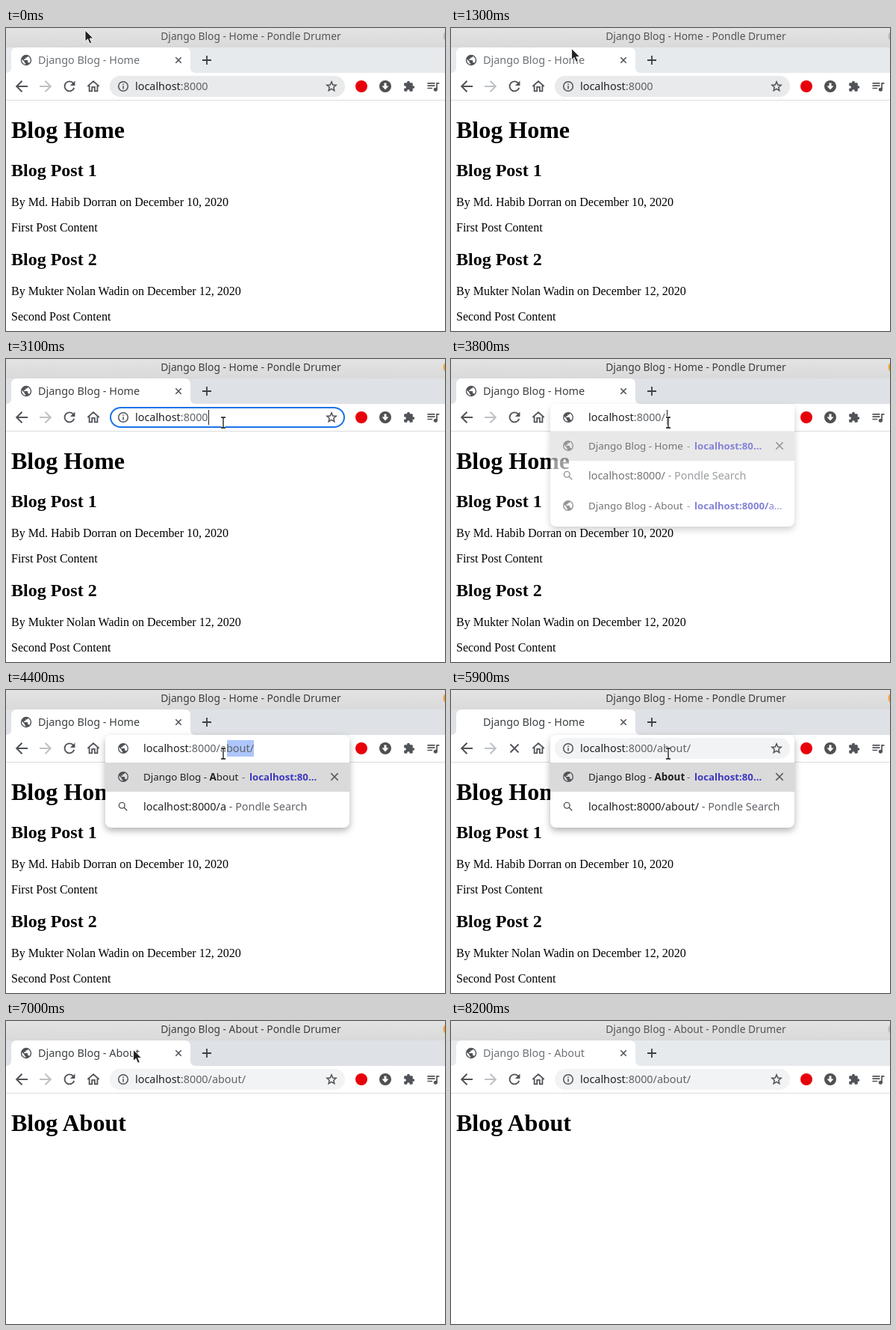
Animation of 588 by 405 pixels, one loop 8.4 s. Source, as an HTML page:

```html
<!DOCTYPE html>
<html lang="en">
<head>
<meta charset="utf-8">
<title>Blog in a browser</title>
<style>
  html, body { margin: 0; width: 100%; height: 100%; overflow: hidden; background: #fff; }
  svg { display: block; width: 588px; height: 405px; }
  text { font: 14.4px "Noto Sans", sans-serif; fill: #5f6368; }
  .title { font-size: 13.8px; text-anchor: middle; }
  .row { font-size: 13.4px; }
  .url { font-size: 13.2px; fill: #3c38c0; }
  .dark { fill: #202124; }
  b, .bold { font-weight: bold; }
  .page { font-family: "Liberation Serif", serif; fill: #000; }
  .line { fill: none; stroke: #505358; stroke-width: 2; }
  .popup { filter: drop-shadow(0 4px 5px rgba(0, 0, 0, .3)); }
</style>
</head>
<body>
<svg id="stage" viewBox="0 0 588 405"></svg>
<script>
const LOOP = 8400, STEP = 100;
const stage = document.getElementById('stage');
const BROWSER = 'Pondle Drumer', SEARCH = 'Pondle Search';
const INK = '#505358';

const text = (x, y, cls, s, extra = '') => `<text x="${x}" y="${y}" class="${cls}" ${extra}>${s}</text>`;
const span = (cls, s) => `<tspan class="${cls}">${s}</tspan>`;
const rect = (x, y, w, h, fill, r = 0, extra = '') =>
  `<rect x="${x}" y="${y}" width="${w}" height="${h}" rx="${r}" fill="${fill}" ${extra}/>`;
const circle = (x, y, r, fill) => `<circle cx="${x}" cy="${y}" r="${r}" fill="${fill}"/>`;
const stroke = (d, extra = '') => `<path class="line" d="${d}" ${extra}/>`;
const cross = (x, y, r, w = 1.6) =>
  stroke(`M${x - r} ${y - r}l${2 * r} ${2 * r}m0 ${-2 * r}l${-2 * r} ${2 * r}`, `style="stroke-width:${w}"`);

// Icons are drawn on a 24 unit grid and centred on the given point
const icon = (x, y, k, body) =>
  `<g transform="translate(${x} ${y}) scale(${k}) translate(-12 -12)">${body}</g>`;
const GLOBE = `<path fill="${INK}" d="M12 2a10 10 0 1 0 0 20 10 10 0 1 0 0-20zm-1 17.93c-3.95-.49-7-3.85-7-7.93 0-.62.08-1.21.21-1.79L9 15v1c0 1.1.9 2 2 2zm6.9-2.54c-.26-.81-1-1.39-1.9-1.39h-1v-3c0-.55-.45-1-1-1H8v-2h2c.55 0 1-.45 1-1V7h2c1.1 0 2-.9 2-2v-.41c2.93 1.19 5 4.06 5 7.41 0 2.08-.8 3.97-2.1 5.39z"/>`;
const INFO = stroke('M12 3a9 9 0 1 0 0 18 9 9 0 1 0 0-18M12 7v2m0 2v6', 'style="stroke-width:2.2"');
const STAR = stroke('M12 4l2.3 5.4 5.8.5-4.4 3.8 1.3 5.7-5-3-5 3 1.3-5.7-4.4-3.8 5.8-.5z');
const LENS = stroke('M9.5 4a5.5 5.5 0 1 0 0 11 5.5 5.5 0 1 0 0-11M13.5 13.5l6 6');
const RELOAD = stroke('M17.5 7.5A7 7 0 1 0 18.7 14') + `<path fill="${INK}" d="M20 4v7h-7z"/>`;
const HOME = stroke('M3.5 12L12 4.4l8.5 7.6M6 11v8h4v-6h4v6h4v-8');
const PUZZLE = rect(2, 5, 17, 17, INK, 2) + circle(10.5, 4, 2.7, INK) + circle(20, 13.5, 2.7, INK) +
  circle(3.2, 13.5, 2.7, '#fff') + circle(10.5, 20.8, 2.7, '#fff');
const QUEUE = stroke('M3 7h12M3 11h12M3 15h8M18 17V7h4') + circle(16, 17, 3, INK);

const address = (x, tail) =>
  text(x, 83, '', span('dark', 'localhost') + ':8000' + tail);
const caret = x => rect(x, 68, 1, 20, '#202124');
const selection = (x, w) => rect(x, 67, w, 22, '#adc6fb');

function windowFrame(s) {
  const focus = s.focus;
  return rect(0, 0, 588, 27, 'url(#bar)') +
    text(328, 16, 'title', `${s.title} - ${BROWSER}`, `style="fill:${focus ? '#3d3d3d' : '#555'}"`) +
    circle(594, 11, 8.5, focus ? '#f2a33a' : '#bdbdbd') +
    rect(0, 26, 588, 34, focus ? '#dee1e6' : '#e7eaed') +
    '<path fill="#fff" d="M0 60q7 0 7-7V34q0-8 8-8h224q8 0 8 8v19q0 7 7 7z"/>' +
    (s.spinner ? stroke('M21.5 40a7 7 0 0 1 9.5-3', 'style="stroke:#8a8d91;stroke-width:1.6"') : '') +
    (s.favicon ? icon(27, 43, .72, GLOBE) : '') +
    text(43, 48, '', s.title, `style="fill:${focus ? '#3c4043' : '#6d7175'}"`) +
    cross(231, 43, 3.7) +
    stroke('M263 43h12m-6-6v12', `style="stroke-width:1.8;stroke:#3c4043"`) +
    rect(0, 60, 588, 37, '#fff') + rect(0, 96, 588, 1, '#dadce0') +
    icon(21, 78, 1, stroke('M20 12H5.5M12.5 4.7L5.2 12l7.3 7.3')) +
    icon(53, 78, 1, stroke('M4 12h14.5M11.5 4.7l7.3 7.3-7.3 7.3', 'style="stroke:#bdc1c6"')) +
    (s.loading ? cross(85, 78, 5.5, 1.8) : icon(85, 78, .93, RELOAD)) +
    icon(117, 78, .9, HOME) +
    circle(476, 78, 8, '#e8000b') +
    circle(508, 78, 8, '#505050') +
    '<path fill="#fff" d="M506.5 73.500h3v4h3l-4.500 5-4.500-5h3z"/>' +
    icon(540, 78, .68, PUZZLE) + icon(572, 78, .84, QUEUE);
}

function pill(s) {
  const ring = s.ring ? 'stroke="#1a73e8" stroke-width="2"' : '';
  const inset = s.ring ? 1 : 0;
  return rect(139 + inset, 64 + inset, 315 - 2 * inset, 28 - 2 * inset, s.ring ? '#fff' : s.pill, 14, ring) +
    icon(157, 78, .7, INFO) + icon(436, 78, .76, STAR) +
    (s.selected ? selection(173, 98) : '') + address(173, s.path) +
    (s.caret ? caret(271) : '');
}

function homePage() {
  const post = (y, n, author, day, word) =>
    text(7, y, 'page bold', `Blog Post ${n}`, 'style="font-size:24px"') +
    text(7, y + 40, 'page', `By ${author} on December ${day}, 2020`, 'style="font-size:16px"') +
    text(7, y + 74, 'page', `${word} Post Content`, 'style="font-size:16px"');
  return post(198, 1, 'Md. Habib Dorran', 10, 'First') + post(317, 2, 'Mukter Nolan Wadin', 12, 'Second');
}

const heading = s => text(7, 147, 'page bold', s, 'style="font-size:32px"');

function siteRow(y, name, url) {
  return icon(157, y - 5, .7, GLOBE) +
    text(184, y, 'row dark', `Django Blog - ${name}`) + text(316, y, 'row', '-') +
    text(326, y, 'url', url);
}

function searchRow(y, query) {
  return icon(157, y - 5, .7, LENS) +
    text(184, y, '', span('dark', query) + ` - ${SEARCH}`);
}

function popup(s) {
  const three = s.typed === '/', height = three ? 164 : 124;
  const query = 'localhost:8000' + s.query;
  const about = s.query === '/about/' ? span('bold', 'About') : span('bold', 'A') + 'bout';
  const short = span('bold', 'localhost:80...');
  const rows = three
    ? siteRow(121, 'Home', short) + searchRow(161, query) +
      siteRow(201, 'About', span('bold', 'localhost:8000/') + 'a...')
    : siteRow(121, about, short) + searchRow(161, query);
  const input = s.entered ? pill(s)
    : icon(157, 78, .7, GLOBE) + (s.completing ? selection(296, 36) : '') +
      address(184, s.path) + (s.caret ? caret(s.path === '/' ? 289 : 332) : '');
  const below = `<g opacity="${s.fade}"><g class="popup">${rect(133, 60, 327, height, '#fff', 8)}</g>` +
    rect(133, 97, 327, 39, '#dadada') + rows + cross(440, 116, 4.7) + '</g>';
  return below + rect(133, 64, 327, 32, '#fff') + rect(133, 60, 327, 20, '#fff', 8) + input;
}

const ARROW = '<path d="M0 0v15l3.500-3.200 2.500 6 2.700-1.100-2.500-5.700h4.800z" fill="#222" stroke="#fff" stroke-width=".9"/>';
const BEAM_PATH = 'M-3-7h2.300l.7.700.7-.7h2.300M0-6.300V6.300M-3 7h2.300l.7-.7.7.7h2.300';
const BEAM = `<path d="${BEAM_PATH}" fill="none" stroke="#fff" stroke-width="3"/>` +
  `<path d="${BEAM_PATH}" fill="none" stroke="#111" stroke-width="1.300"/>`;

function pointer(t) {
  const mix = (a, b, k) => a + (b - a) * k;
  let x, y;
  if (t < 6700) {
    const k = Math.min(1, Math.max(0, (t - 1100) / 1000));
    const ease = 1 - (1 - k) ** 1.6;
    x = mix(106, 291, ease);
    y = mix(3, 85, ease);
  } else {
    const k = Math.min(1, (t - 6600) / 900);
    x = mix(291, 20, k);
    y = mix(85, -20, k);
  }
  const overField = y > 64 && x > 139;
  return `<g transform="translate(${x} ${y})">${overField ? BEAM : ARROW}</g>`;
}

function state(t) {
  const done = t >= 6100;
  const typed = t < 4400 ? '/' : '/a';
  return {
    focus: t >= 2800 && t < 8200,
    title: t < 6100 ? 'Django Blog - Home' : t < 6200 ? 'localhost:8000/about/' : 'Django Blog - About',
    favicon: t < 5900 || t >= 6200,
    spinner: t >= 6000 && t < 6200,
    loading: t >= 5800 && t < 6200,
    pill: t < 2800 ? '#e8eaeb' : '#f1f3f4',
    ring: t >= 2800 && t < 3800,
    selected: t >= 2800 && t < 3100,
    caret: (t >= 3100 && t < 3600) || (t >= 3800 && t < 4300) || (t >= 5300 && t < 5800),
    path: t < 3800 ? '' : t < 4300 ? '/' : '/about/',
    completing: t >= 4300 && t < 5300,
    open: t >= 3800 && t < 6000,
    entered: t >= 5800,
    fade: t < 3900 ? .62 : 1,
    query: t >= 5300 ? '/about/' : typed,
    typed, done
  };
}

function draw(t) {
  const s = state(t);
  stage.innerHTML =
    '<defs><linearGradient id="bar" x2="0" y2="1"><stop stop-color="#e3e3e3"/>' +
    '<stop offset="1" stop-color="#d9d9d9"/></linearGradient></defs>' +
    rect(0, 0, 588, 405, '#fff') + windowFrame(s) +
    (s.done ? heading('Blog About') : heading('Blog Home') + homePage()) +
    (s.open ? popup(s) : pill(s)) + pointer(t);
}

const start = performance.now();
let shown = -1;
function tick() {
  const t = Math.floor((performance.now() - start) % LOOP / STEP) * STEP;
  if (t !== shown) draw(shown = t);
  requestAnimationFrame(tick);
}
tick();
</script>
</body>
</html>
```
